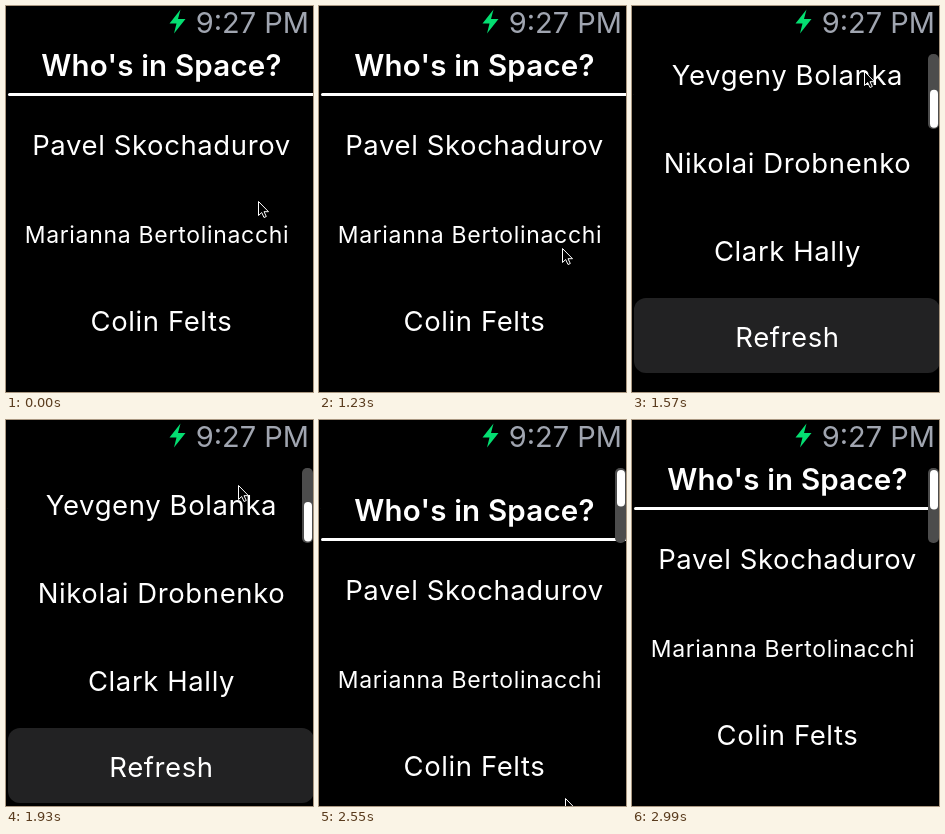
An HTML page that plays this animation: 307 by 386 pixels, repeating every 3.18 s.

```html
<!DOCTYPE html>
<html lang="en">
<head>
<meta charset="utf-8">
<title>Watch list</title>
<style>
html, body { margin: 0; width: 100%; height: 100%; overflow: hidden; background: #000; }
svg { display: block; width: 307px; height: 386px; }
text { font: 27.5px Inter, Roboto, sans-serif; letter-spacing: .6px; fill: #fff; text-anchor: middle; }
.title { font-size: 29.5px; font-weight: 600; letter-spacing: .2px; }
.small { font-size: 23px; letter-spacing: .7px; }
.clock { font-size: 29px; letter-spacing: 0; fill: #a0a5b0; text-anchor: end; }
</style>
</head>
<body>
<svg viewBox="0 0 307 386">
  <clipPath id="view"><rect y="40" width="307" height="346"/></clipPath>
  <rect width="307" height="386"/>
  <g clip-path="url(#view)">
    <g id="list">
      <text class="title" x="155.5" y="70">Who's in Space?</text>
      <rect x="2" y="87" width="308" height="3" rx="1.5" fill="#fff"/>
      <rect x="2" y="626" width="306" height="75" rx="12" fill="#222223"/>
      <text x="155.5" y="674.5">Refresh</text>
    </g>
  </g>
  <path d="M174.500 3.500L163.500 17.500H170.500L168 27.500L179.500 13H172Z" fill="#04de71"/>
  <text class="clock" x="303" y="27">9:27 PM</text>
  <g id="bar">
    <rect x="296" y="48" width="11" height="75" rx="5" fill="#4c4c4c"/>
    <rect id="thumb" x="298" width="8" rx="4" fill="#fff"/>
  </g>
  <path id="cursor" d="M.5.5V14.500L3.700 11.500L6 16.500L8.300 15.500L6 10.700H10.500Z" stroke="#fff"/>
</svg>
<script>
const LOOP = 3180, TICK = 88, MAX = 318;
const $ = id => document.getElementById(id);

const people = ["Pavel Skochadurov", "Marianna Bertolinacchi", "Colin Felts",
  "Yevgeny Bolanka", "Nikolai Drobnenko", "Clark Hally"];
people.forEach((name, i) => {
  const row = document.createElementNS("http://www.w3.org/2000/svg", "text");
  const small = name.length > 20;
  row.setAttribute("x", small ? 151 : 155.5);
  row.setAttribute("y", 149 + 88 * i);
  if (small) row.setAttribute("class", "small");
  row.textContent = name;
  $("list").append(row);
});

const linear = u => u;
const smooth = u => u * u * (3 - 2 * u);
const out = u => 1 - (1 - u) ** 3;

// Runs from one value to the next between two ticks, held outside them
const move = (k, from, to, a, b, ease) =>
  (b - a) * ease(Math.min(1, Math.max(0, (k - from) / (to - from))));

// Flick to the end, spring back, drag to the top, spring back
const scrollAt = k =>
  move(k, 14, 18, 0, MAX + 16, smooth) +
  move(k, 18, 22, MAX + 16, MAX, out) +
  move(k, 22.7, 29, MAX, -31, smooth) +
  move(k, 29, 34, -31, 0, out);

const cursorAt = k => [
  252 + move(k, 2, 11, 252, 243, linear) + move(k, 14, 18, 243, 232, linear) +
    move(k, 25, 30, 232, 250, linear),
  195 + move(k, 2, 11, 195, 286, linear) + move(k, 12.4, 18, 286, 65, smooth) +
    move(k, 22, 25, 65, 264, linear) + move(k, 25, 30, 264, 406, linear)
];

function draw(now) {
  const k = Math.floor((now % LOOP + 15) / TICK);
  const s = Math.round(scrollAt(k));
  const over = Math.max(-s, s - MAX, 0);
  $("list").setAttribute("transform", `translate(0 ${-s})`);
  $("cursor").setAttribute("transform", `translate(${cursorAt(k).map(Math.round)})`);
  $("bar").setAttribute("visibility", k > 14 ? "visible" : "hidden");
  $("thumb").setAttribute("y", 50 + Math.max(s, 0) * 0.101);
  $("thumb").setAttribute("height", 39.5 - over * 0.1);
}

const start = performance.now();
function loop() {
  draw(performance.now() - start);
  requestAnimationFrame(loop);
}
loop();
</script>
</body>
</html>
```
